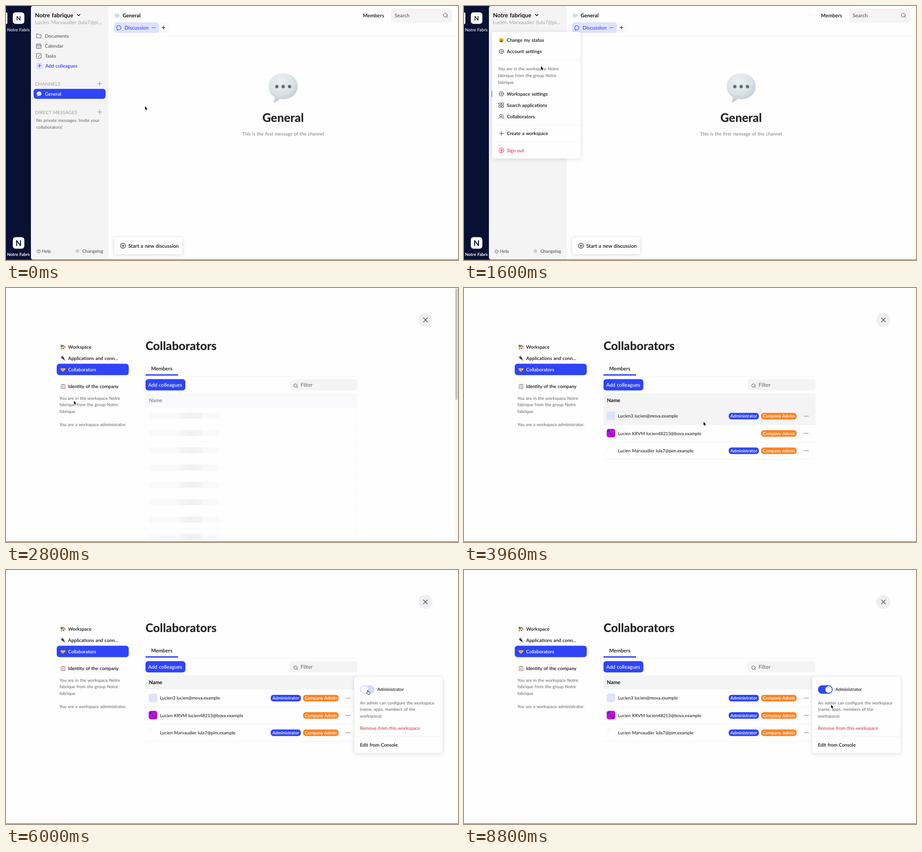
Animation of 998 by 561 pixels, one loop 8840 ms. Source, as an HTML page:

```html
<!DOCTYPE html>
<html lang="en">
<head>
<meta charset="utf-8">
<title>Collaborators</title>
<style>
html, body { margin: 0; width: 100%; height: 100%; overflow: hidden; background: #fefefe }
svg { display: block }
text { font-family: Lato, "Open Sans", sans-serif; word-spacing: .06em; text-rendering: geometricPrecision; white-space: pre }
.line { fill: none; stroke: currentColor; stroke-linecap: round; stroke-linejoin: round }
.card { fill: #fefefe; filter: drop-shadow(0 1px 4px rgba(20, 25, 60, .16)) }
</style>
</head>
<body>
<svg id="stage" width="100%" height="100%" viewBox="0 0 998 561"></svg>
<script>
const BLUE = '#2f45f5', INK = '#3042e0', PALE = '#dfe2fc', GREY = '#f4f4f5', MID = '#6c6c6e', SOFT = '#a5a5a9', DARK = '#111', RED = '#e0394f', PAGE = '#fefefe';

// y is the middle of the capitals
const text = (x, y, size, str, fill = DARK, weight = 500, more = '') =>
  `<text x="${x}" y="${y + size * .355}" font-size="${size}" fill="${fill}" font-weight="${weight}" ${more}>${str}</text>`;
const box = (x, y, w, h, r, fill, more = '') =>
  `<rect x="${x}" y="${y}" width="${w}" height="${h}" rx="${r}" fill="${fill}" ${more}/>`;
const dot = (x, y, r, fill) => `<circle cx="${x}" cy="${y}" r="${r}" fill="${fill}"/>`;
const ring = (x, y, r, w = 1) => `<circle class="line" cx="${x}" cy="${y}" r="${r}" stroke-width="${w}"/>`;
const line = (d, w = 1) => `<path class="line" stroke-width="${w}" d="${d}"/>`;
const shape = (d, fill) => `<path d="${d}" fill="${fill}"/>`;
const rule = (x, y, w, fill = '#f3f3f4') => box(x, y, w, 1, 0, fill);
const group = (body, color = DARK, more = '') => `<g color="${color}" ${more}>${body}</g>`;
const at = (x, y, body, scale = 1) => `<g transform="translate(${x} ${y}) scale(${scale})">${body}</g>`;
const plus = (x, y, r, w = 1) => line(`M${x - r} ${y}h${2 * r}M${x} ${y - r}v${2 * r}`, w);
const dots = (x, y, gap, r, fill) => [-gap, 0, gap].map(d => dot(x + d, y, r, fill)).join('');
const lens = (x, y, r) => ring(x, y, r) + line(`M${x + r * .7} ${y + r * .7}l2.5 2.5`);
const lines = (x, y, rows) => rows.map((s, i) => text(x, y + i * 14.6, 9.5, s, MID)).join('');

const bubble = scale => shape('M-32 -1C-32 -18 -18 -29 0 -29S32 -18 32 -1 18 28 0 28Q-4 28 -8 27Q-13 34 -22 35Q-18 30 -19 23Q-32 15 -32 -1Z', 'url(#glass)') +
  dots(0, 0, 14, 3.7, scale ? '#8b98a0' : '#5c707c');
const gear = ring(0, 0, 4.5) + ring(0, 0, 1.8, .9) +
  '<circle class="line" r="5.3" stroke-width="1.1" stroke-dasharray="1.6 2.56" style="stroke-linecap:butt"/>';
const tiles = [[-5, -5], [1, -5], [-5, 1], [1, 1]].map(([x, y]) => line(`M${x} ${y}h4v4h-4z`)).join('');
const people = ring(-1.5, -2, 2.6) + line('M-6 5Q-5.5 1.2 -1.5 1.2T3 5M2.5 -4.6A2.6 2.6 0 0 1 2.7 .4Q5.5 1 6 5');
const exit = line('M-4.6 -2.5A5.2 5.2 0 1 1 -4.6 2.5M-6 0H2M-.3 -2.4L2.2 0L-.3 2.4', 1.1);
const smiley = dot(0, 0, 5.3, '#f8b92f') + dot(-1.8, -1.3, .8, '#6b3d10') + dot(1.8, -1.3, .8, '#6b3d10') + shape('M-3 1H3Q2.4 4 0 4T-3 1Z', '#7c3b17');
const house = dot(-3, -2, 2.8, '#4f9a45') + shape('M-3 1L1 -3.5L5 1V5H-3V1Z', '#ecd9c4') + shape('M-4 .8L1 -4.5L6 1L5 2L1 -2L-3 2Z', '#b35b43') + box(0, 2, 2, 3, 0, '#78503a') + dot(-4, 4, 1.6, '#63a84f');
const plug = at(0, 0, shape('M-5 -1L-1 -5L4 1L1 4Z', '#3d4247') + line('M-5 -4L-3 -2M-2 -6L-1 -4M2 3L5 5', 1.3), .88);
const hands = shape('M-6 -2L-2 -3L0 -2L2 -3L6 -2L4 1L0 5L-4 2Z', '#f2b844') + line('M-1 0L2 3', .6);
const board = box(-5, -5, 10, 10.5, 1, '#b98d7c') + box(-3.8, -3.8, 7.6, 8.2, 0, '#eceef2') + box(-2, -5.5, 4, 2, .5, '#8b8f98') +
  group(line('M-2.6 -1h5M-2.6 1h5M-2.6 3h5', .6), '#999');

const rail = box(0, 0, 70, 561, 0, '#081133') + box(-4, 14, 7, 26, 3, '#fff') +
  [[14, 13.5, 53, 500], [510.5, 17.5, 549, 700]].map(([y, size, label, weight]) =>
    box(15, y, 25.5, 25.5, 6, '#fefefe') + text(27.7, y + 13, size, 'N', '#0b1233', 700, 'text-anchor="middle"') +
    `<svg y="${label - 10}" width="52" height="20">${text(2.5, 10, 9.4, 'Notre Fabrique', '#fff', weight)}</svg>`).join('');

const sidebar = shape('M60 0H226V560H60Q55 560 55 555V5Q55 0 60 0Z', GREY) +
  text(64, 20, 12.8, 'Notre fabrique', DARK, 700) + group(line('M157.5 18.5l3 3l3 -3', 1.6)) +
  text(64, 36.5, 11.2, 'Lucien Marvaudier (lula7@pi...', SOFT, 400) +
  group(line('M67.5 62v8.5h10v-7h-5l-1.5 -2h-3.5z') + line('M67.5 84.5h10v9h-10zM67.5 87.5h10M70 83v2M75 83v2') +
    line('M69.5 90h.3M72.4 90h.3M75.3 90h.3M69.5 92h.3M72.4 92h.3') +
    line('M67.5 105h10v10h-10zM70 110l2 2l3.2 -4'), '#555') +
  ['Documents', 'Calendar', 'Tasks'].map((s, i) => text(86, 66.5 + i * 21.8, 10.4, s, '#555')).join('') +
  box(67, 125, 14, 14, 3, PALE) + group(plus(74, 132, 3.6, 1.2), INK) + text(87, 132, 10.5, 'Add colleagues', INK, 600) +
  text(64, 172.5, 10.6, 'CHANNELS', SOFT, 500) + text(64, 234.8, 10.5, 'DIRECT MESSAGES', SOFT, 500) +
  group(plus(207, 171.5, 5) + plus(207, 234, 5), '#8a8a8e') +
  box(61, 183, 159, 22, 6, BLUE) + at(73, 194, bubble(1), .17) + text(86, 194, 10.5, 'General', '#fff') +
  text(67, 253, 9.6, 'No private messages. Invite your', MID) + text(67, 267.5, 9.6, 'collaborators!', MID) +
  group(ring(72, 542, 3.6, .9), '#555') + text(72, 542, 5.5, '?', '#555', 700, 'text-anchor="middle"') +
  text(79, 541.8, 9.7, 'Help', '#555') + dot(157.5, 541.3, 4, '#cfcfd1') + text(168.5, 541.8, 9.9, 'Changelog', '#555');

const channel = box(226, 66, 771, 1, 0, '#f1f1f2') +
  at(245, 20.5, bubble(1), .18) + text(257.5, 21, 11.4, 'General', DARK, 700) +
  box(761, 20, 5, 1, 0, '#e9e9e9') + text(788, 21.2, 11.2, 'Members', DARK, 600) +
  box(850, 6, 135, 30.5, 6, GREY) + text(858, 21.2, 11.3, 'Search', '#555') + group(lens(970, 20.2, 4.2), '#444') +
  box(239, 36, 98.5, 23.5, 5, PALE) + group(line('M246.2 51.8A4.7 4.7 0 1 1 248 52.6L245.5 53Z', 1.1), INK) +
  text(262, 48, 11.2, 'Discussion', INK) + dots(326, 47.7, 3.2, 1, INK) +
  `<circle class="card" cx="347.5" cy="47.5" r="8" opacity=".7"/>` + group(plus(347.5, 47.5, 3.5, 1.2)) +
  at(612, 178, bubble(0)) + text(611.8, 247, 26.2, 'General', '#222', 800, 'text-anchor="middle"') +
  text(611.8, 282.5, 10.4, 'This is the first message of the channel', '#858587', 500, 'text-anchor="middle"') +
  box(239, 511, 150, 37, 4, '', 'class="card"') + group(ring(258.3, 529.5, 5.4, 1.1) + plus(258.3, 529.5, 2.8, 1.1)) +
  text(270, 530, 11.2, 'Start a new discussion', DARK, 600);

const items = [[75.5, smiley, 'Change my status'], [100.5, gear, 'Account settings'], [194, gear, 'Workspace settings'],
  [219, tiles, 'Search applications'], [244, people, 'Collaborators'], [281.5, plus(0, 0, 5), 'Create a workspace'], [319, exit, 'Sign out', RED]];
const menu = box(62, 57, 195.5, 280, 5, '', 'class="card"') + rule(62, 119, 195) + rule(62, 263, 195) + rule(62, 300, 195) +
  items.map(([y, icon, label, color = DARK]) => group(box(69, y - 12.3, 182, 24.6, 5, PALE, 'class="hover"') +
    group(at(82.5, y, icon), color === DARK ? '#444' : color, 'class="icon"') + text(94.5, y, 10.4, label, 'currentColor', 600), color, 'class="item"')).join('') +
  lines(75, 139, ['You are in the workspace Notre', 'fabrique from the group Notre', 'fabrique']);

const tabs = [[130, house, 'Workspace'], [155, plug, 'Applications and conn...'], [180, hands, 'Collaborators'], [217.5, board, 'Identity of the company']];
const panel = box(0, 0, 998, 561, 0, PAGE) +
  dot(926, 70.5, 15.5, '#efeff2') + group(line('M921.5 66l9 9M930.5 66l-9 9', 1.4), '#555') +
  box(112, 167.3, 159, 25.2, 6, BLUE) +
  tabs.map(([y, icon, label]) => at(126, y, group(icon, '#444')) + text(137.3, y, 10.4, label, y === 180 ? '#fff' : DARK, 600)).join('') +
  lines(118, 243.5, ['You are in the workspace Notre', 'fabrique from the group Notre', 'fabrique', '', 'You are a workspace administrator.']) +
  text(308, 127.5, 26, 'Collaborators', '#222', 800) + text(320.5, 178, 11.2, 'Members', DARK, 600) +
  rule(308, 194.5, 468) + box(308, 190.5, 72, 3, 0, BLUE) +
  box(308, 201.2, 88, 25, 6, BLUE) + text(314, 214, 11.2, 'Add colleagues', '#fff') +
  box(626, 201.2, 150, 25, 6, GREY) + group(lens(639, 215.5, 3.8), '#555') + text(650.5, 214, 11.5, 'Filter', MID);

const bars = [...Array(8)].map((_, i) => 282 + i * 38.2);
const skeleton = box(308, 232.5, 468, 31.5, 3, '#f9f9fc') + text(315.5, 248, 11.2, 'Name', '#8d8d90', 700) +
  bars.map(y => box(315, y - 6.5, 156, 13, 6.5, 'url(#sheen)') + rule(308, y + 18.7, 468, '#fafafa')).join('') +
  box(308, 264, 1, 296, 0, '#fafafb') + box(775, 264, 1, 296, 0, '#fafafb') +
  box(990, 0, 8, 561, 0, '#f9f9fa') + box(992, 1, 5, 246, 2.5, '#c4c4c6');

const tag = (x, y, w, label, fill, more = '') => `<g ${more}>${box(x, y - 7.2, w, 14.5, 6, fill)}${text(x + w / 2, y, 9.7, label, '#fff', 600, 'text-anchor="middle"')}</g>`;
const patches = box(315, 311, 19, 19, 5, '#c310d8') + dot(319, 316, 2.6, '#4a1fe0') + dot(329, 314, 2.2, '#e6126e') +
  dot(324, 322, 2.4, '#5a20e2') + dot(330, 326, 2.3, '#3b22e0') + dot(318.5, 326, 2.2, '#e3107a');
const broken = group(line('M316 355l3 -2M320 351.5h4M317 360h2', .8), '#dcdce0');
const members = [['Lucien3 lucien@mova.example', box(315, 273, 19, 19, 5, PALE)], ['Lucien KRVM lucien48213@bova.example', patches], ['Lucien Marvaudier lula7@pim.example', broken]];
const table = box(308, 232.5, 468, 31.5, 3, GREY) + text(315.5, 248, 11.2, 'Name', DARK, 700) +
  members.map(([name, face], i) => {
    const y = 283 + i * 38.2;
    return box(308, y - 19, 468, 38, 0, GREY, 'class="row"') + rule(308, y + 18.5, 468) + face + text(340, y, 9.8, name, '#222', 500) +
      tag(584.5, y, 66.5, 'Administrator', BLUE, i === 1 ? 'id="granted"' : '') + tag(656, y, 78.5, 'Company Admin', '#fb8325') + dots(755.5, y, 3.8, 1.1, '#68686c');
  }).join('');

const popup = box(769, 236, 195, 168.5, 5, '', 'class="card"') +
  box(781.5, 254.8, 32.5, 18.4, 9.2, PALE) + box(781.5, 254.8, 32.5, 18.4, 9.2, BLUE, 'id="on"') + `<circle id="knob" cy="264" r="7.3" fill="#fff"/>` +
  text(820, 264, 9.7, 'Administrator', DARK, 500) +
  lines(781.5, 293.5, ['An admin can configure the workspace', '(name, apps, members of the', 'workspace).']) +
  text(781.5, 349, 10.3, 'Remove from this workspace', RED, 500) + rule(769, 367, 195) + text(781.5, 386, 10.4, 'Edit from Console', DARK, 600);

const pointer = `<g id="arrow"><path d="M0 0V7.6L1.7 6.1L2.9 9L4.2 8.5L3 5.7H5.4Z" fill="#000" stroke="#fff" stroke-width=".8" paint-order="stroke"/></g>
<g id="hand"><path d="M-1 0Q0 -1 .8 0V3L4 3.7Q5 4 4.8 5.4L4 8.5H0L-3 5Q-3 4 -1 4.6Z" fill="#fff" stroke="#111" stroke-width=".9" stroke-linejoin="round"/></g>`;

const $ = id => document.getElementById(id);
$('stage').innerHTML = `<defs>
<radialGradient id="glass" cx=".4" cy=".25" r=".85"><stop stop-color="#eaf0f2"/><stop offset=".55" stop-color="#dae2e6"/><stop offset="1" stop-color="#b4c1c8"/></radialGradient>
<linearGradient id="sheen" gradientUnits="userSpaceOnUse" x1="-26" x2="26"><stop stop-color="#f9f9fc"/><stop offset=".06" stop-color="#f4f4f5"/><stop offset=".5" stop-color="#f0f0f1"/><stop offset=".92" stop-color="#f3f3f4"/><stop offset="1" stop-color="#f9f9fc"/></linearGradient>
</defs>${box(0, 0, 998, 561, 0, PAGE)}${rail}${sidebar}${channel}
<g id="menu">${menu}</g>
<g id="panel">${panel}<g id="skeleton">${skeleton}</g><g id="table">${table}</g><g id="popup">${popup}</g></g>
${box(0, 560, 998, 1, 0, '#4b4b4d')}<g id="cursor">${pointer}</g>`;

const LOOP = 8840;
// time, x, y of the pointer
const path = [[40, 307, 221.5], [640, 142, 41], [840, 142, 41], [1600, 170, 133], [2160, 117, 247], [2480, 117, 247], [2800, 150, 249],
  [3320, 330, 275], [3560, 330, 275], [4400, 757, 319.5], [5160, 757, 319.5], [5960, 799, 266], [6120, 799, 266], [6640, 810.5, 297.5]];
const ramp = (t, a, b) => Math.max(0, Math.min(1, (t - a) / (b - a)));
const ease = p => p * p * (3 - 2 * p);
const show = (el, on) => el.style.display = on ? '' : 'none';
const fade = (id, p) => { $(id).style.opacity = p; show($(id), p > 0); };

function locate(t) {
  let [, x, y] = path[0];
  for (let i = 1; i < path.length; i++) {
    const [a, x0, y0] = path[i - 1], [b, x1, y1] = path[i], p = ease(ramp(t, a, b));
    x += (x1 - x0) * p;
    y += (y1 - y0) * p;
  }
  return [x, y];
}

const menuItems = document.querySelectorAll('.item'), rows = document.querySelectorAll('.row');

function draw(t) {
  const [x, y] = locate(t);
  $('cursor').setAttribute('transform', `translate(${x} ${y})`);
  const onDots = t > 3560 && Math.abs(x - 756) < 8, onToggle = t > 5160 && x > 781 && x < 814 && y < 273;
  show($('hand'), onDots || onToggle);
  show($('arrow'), !onDots && !onToggle);

  fade('menu', ramp(t, 820, 980));
  menuItems.forEach((el, i) => {
    const [mid, , , color = DARK] = items[i], over = t > 840 && Math.abs(y - mid) < 12.4;
    show(el.querySelector('.hover'), over);
    el.setAttribute('color', over ? INK : color);
    el.querySelector('.icon').setAttribute('color', over ? INK : color === DARK ? '#444' : color);
  });

  fade('panel', ramp(t, 2500, 2640));
  show($('skeleton'), t < 3120);
  show($('table'), t >= 3120);
  $('sheen').setAttribute('gradientTransform', `translate(${408.5 + (t - 2800) * .35} 0)`);
  rows.forEach((el, i) => show(el, x > 308 && x < 769 && Math.abs(y - 283 - i * 38.2) < 19.1));

  fade('popup', ramp(t, 4760, 4960));
  const on = ease(ramp(t, 5980, 6160));
  $('on').style.opacity = on;
  $('knob').setAttribute('cx', 791 + 14 * on);
  show($('granted'), t >= 6020);
}

const start = performance.now();
(function tick() {
  draw((performance.now() - start) % LOOP);
  requestAnimationFrame(tick);
})();
</script>
</body>
</html>
```
